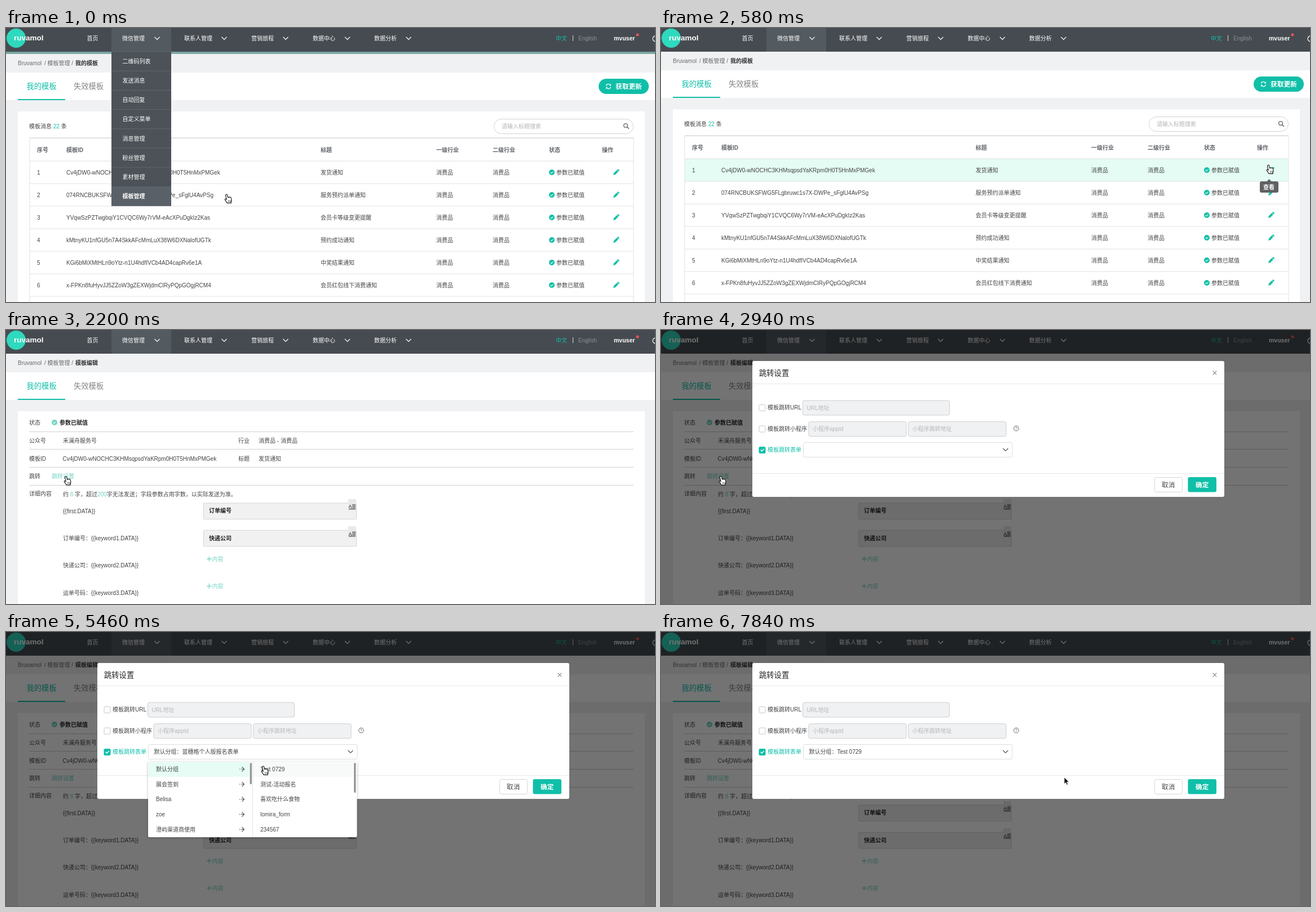
An HTML page that plays this animation: 1151x486 px, repeating every 7990 ms.

```html
<!DOCTYPE html>
<html lang="zh-CN">
<head>
<meta charset="utf-8">
<style>
html, body { margin: 0; width: 100%; height: 100%; overflow: hidden; background: #f0f1f3; }
svg { display: block; font: 10px "Liberation Sans", "Noto Sans CJK SC", "Noto Sans CJK", sans-serif; }
</style>
</head>
<body>
<svg id="stage" width="1151" height="486" viewBox="0 0 1151 486"></svg>
<script>
const TEAL = '#10bfa8', SOFT = '#74d3c4', INK = '#444', LINE = '#e0e2e4';

// Text is placed by its left edge and vertical middle.
const text = (x, y, s, fill = INK, size = 10, bold = false) =>
  `<text x="${x}" y="${y + size * .37}" fill="${fill}" font-size="${size}"${bold ? ' font-weight="bold"' : ''}>${s}</text>`;
const rect = (x, y, w, h, fill, extra = '') =>
  `<rect x="${x}" y="${y}" width="${w}" height="${h}" fill="${fill}" ${extra}/>`;
const box = (x, y, w, h, fill, stroke, r = 3) => rect(x, y, w, h, fill, `stroke="${stroke}" rx="${r}"`);
const path = (d, stroke, width = 1, extra = '') =>
  `<path d="${d}" fill="none" stroke="${stroke}" stroke-width="${width}" ${extra}/>`;
const circle = (x, y, r, fill, extra = '') => `<circle cx="${x}" cy="${y}" r="${r}" fill="${fill}" ${extra}/>`;
const group = (id, body, extra = '') => `<g id="${id}" ${extra}>${body}</g>`;
const tint = (s, fill) => `<tspan fill="${fill}">${s}</tspan>`;
const chevron = (x, y, color) => path(`M${x - 4.5} ${y - 2}l4.5 4.5l4.5-4.5`, color, 1.2);
const tick = (x, y, color) => circle(x, y, 5, color) + path(`M${x - 2.3} ${y}l1.8 1.8l3-3.3`, '#fff', 1.1);
const pencil = y => `<g transform="translate(1082 ${y}) rotate(45)" fill="${TEAL}">
  <path d="M-1.9-3.6h3.8v7.2l-1.9 3.4l-1.9-3.4z"/><path d="M-1.9-4.4v-1.4q0-1 1-1h1.8q1 0 1 1v1.4z"/></g>`;

function header() {
  const menus = [[206, '微信管理', 268], [316, '联系人管理', 387], [435, '营销旅程', 496],
                 [544, '数据中心', 605.5], [653, '数据分析', 714]];
  return rect(0, 0, 1151, 42, '#464b51') + rect(187, 0, 106, 42, '#535a60')
    + circle(18, 18, 17, '#2fd9bd') + text(14, 17.5, 'ruvamol', '#fff', 13.5, true)
    + text(143.5, 18, '首页', '#fff')
    + menus.map(([x, s, cx]) => text(x, 18, s, '#fff') + chevron(cx, 18, '#fff')).join('')
    + text(975, 18, '中文', TEAL) + rect(1005, 13, 1, 10, '#ddd') + text(1015, 18, 'English', '#8b9095')
    + text(1078, 18, 'mvuser', '#fff', 10.5, true) + circle(1120, 12, 2.5, '#f25555')
    + circle(1152, 19, 5, 'none', 'stroke="#fff" stroke-width="1.2"');
}

function navMenu() {
  const items = ['二维码列表', '发送消息', '自动回复', '自定义菜单', '消息管理', '粉丝管理', '素材管理', '模板管理'];
  const h = 34.2;
  return rect(187, 42, 106, h * 8, '#4c5258') + rect(187, 42 + h * 7, 106, h, '#596067')
    + items.map((s, i) => rect(187, 41.5 + h * i, 106, 1, '#5f666c')
      + text(206.5, 59 + h * i, s, '#fff', 10, i == 7)).join('');
}

function frame() {
  return text(21, 58, 'Bruvamol', '#6a6a6a') + text(68, 58, '/ 模板管理 /', '#6a6a6a')
    + rect(0, 75, 1151, 49, '#fff') + rect(21, 122, 84, 2, TEAL)
    + text(36.5, 99.5, '我的模板', TEAL, 13.3) + text(120, 99.5, '失效模板', '#858585', 13.3)
    + rect(21, 144, 1112, 350, '#fff');
}

function list() {
  const rows = [
    ['Cv4jDW0-wNOCHC3KHMsqpsdYaKRpm0H0T5HnMxPMGek', '发货通知'],
    ['074RNCBUKSFWG5FLgbruwc1s7X-DWPe_sFglU4AvPSg', '服务预约派单通知'],
    ['YVqwSzPZTwgbqiY1CVQC6Wy7rVM-eAcXPuDgkIz2Kas', '会员卡等级变更提醒'],
    ['kMtnyKU1nfGU5n7A4SkkAFcMmLuX38W6DXNalofUGTk', '预约成功通知'],
    ['KGi6bMiXMtHLn9oYtz-n1U4hdfIVCb4AD4capRv6e1A', '中奖结果通知'],
    ['x-FPKn8fuHyvJJ5ZZoW3gZEXWjdmClRyPQpGOgjRCM4', '会员红包线下消费通知']];
  const cols = [55, 107, 558, 763, 863, 963, 1057];
  const heads = ['序号', '模板ID', '标题', '一级行业', '二级行业', '状态', '操作'];
  const row = ([id, title], i) => {
    const y = 252 + 40 * i;
    const cells = [i + 1, id, title, '消费品', '消费品'];
    return cells.map((s, c) => text(cols[c], y, s)).join('') + tick(968, y, TEAL)
      + text(976, y, '参数已赋值') + pencil(y) + rect(42, y + 19.5, 1071, 1, LINE);
  };
  return text(123, 58, '我的模板', '#333', 10, true)
    + rect(1051, 86, 89, 27, TEAL, 'rx="13.5"') + text(1081, 99.5, '获取更新', '#fff', 11.7, true)
    + path('M1064.3 98.5a4.2 4.2 0 0 1 7.8-.8M1072.6 100.7a4.2 4.2 0 0 1-7.8.8', '#fff', 1.2)
    + path('M1072.5 95.3v2.7h-2.6M1064.4 103.9v-2.7h2.6', '#fff')
    + text(41, 170, `模板消息 ${tint('22', TEAL)} 条`)
    + box(865.5, 157.5, 247, 26, '#fff', '#d0d3d6', 13) + text(879, 170.5, '请输入标题搜索', '#b4b4b4')
    + circle(1099, 169, 3.4, 'none', 'stroke="#666" stroke-width="1.3"') + path('M1101.5 171.5l3.3 3.3', '#666', 1.6)
    + group('hover', rect(42, 232, 1071, 40, '#e5fcf4'))
    + rect(42, 190.5, 1071, 1.2, '#c9cdd1') + rect(41.5, 191, 1, 300, LINE) + rect(1112.5, 191, 1, 300, LINE)
    + heads.map((s, i) => text(cols[i], 212, s, '#60646a', 10, true)).join('')
    + rect(42, 231.5, 1071, 1, LINE) + rows.map(row).join('')
    + group('tip', '<path d="M1074 272.5l4.5-4.5l4.5 4.5z" fill="#5f6163"/>'
      + rect(1062, 272, 33, 20, '#5f6163', 'rx="3"') + text(1068, 282, '查看', '#fff', 10, true));
}

function edit() {
  const field = (y, s) => box(350.5, y - 14, 271, 28.5, '#f1f1f1', '#d5d5d5', 1)
    + rect(607, y - 21, 14, 21, '#e9e9e9') + text(360, y - .5, s, '#222', 10, true)
    + text(607.5, y - 8, 'A', '#222', 9) + path(`M614 ${y - 11}h6m-6 2.5h6m-6 2.5h6M608 ${y - 3.5}h12`, '#222', 1);
  const add = y => path(`M356 ${y}h8.5m-4.2-4.2v8.4`, SOFT, 1.3) + text(365.5, y, '内容', SOFT);
  return text(123, 58, '模板编辑', '#333', 10, true)
    + [180, 211, 243, 275].map(y => rect(41, y, 1072, 1, '#d0d0d0')).join('')
    + text(41, 164, '状态') + tick(86, 164, SOFT) + text(95, 164, '参数已赋值', '#222', 10, true)
    + text(41, 196, '公众号') + text(101, 196, '禾澜舟服务号') + text(412, 196, '行业') + text(448, 196, '消费品 - 消费品')
    + text(41, 228, '模板ID') + text(100.5, 228, 'Cv4jDW0-wNOCHC3KHMsqpsdYaKRpm0H0T5HnMxPMGek')
    + text(412, 228, '标题') + text(448, 228, '发货通知')
    + text(41, 259.5, '跳转') + text(81, 259.5, '跳转设置', SOFT) + text(41, 290, '详细内容')
    + text(101, 291.5, `约 ${tint('8', SOFT)} 字，超过${tint('200', SOFT)}字无法发送；字段参数占用字数，以实际发送为准。`)
    + ['{{first.DATA}}', '订单编号：{{keyword1.DATA}}', '快递公司：{{keyword2.DATA}}', '运单号码：{{keyword3.DATA}}']
      .map((s, i) => text(101, 321 + 48.3 * i, s)).join('')
    + field(321, '订单编号') + field(369.3, '快递公司') + add(406) + add(454.3);
}

function modal() {
  const check = (y, on) => box(174, y - 5.5, 11, 11, on ? TEAL : '#fff', on ? TEAL : '#c4c8cc', 1.5)
    + (on ? path(`M176.7 ${y - .2}l2.2 2.2l3.7-4.1`, '#fff', 1.4) : '');
  const input = (x, y, w, s) => box(x, y, w, 26, '#f0f1f2', '#cbced2') + text(x + 7, y + 13, s, '#b5b8bc');
  return rect(0, 0, 1151, 486, '#000', 'opacity=".55"')
    + rect(162, 55, 837, 241, '#fff', 'rx="3"')
    + text(174, 76, '跳转设置', '#222', 13.3) + path('M978.7 72.7l6.6 6.6m0-6.6l-6.6 6.6', '#888', 1.2)
    + rect(162, 95, 837, 1, '#e6e8ea') + rect(162, 254, 837, 1, '#e6e8ea')
    + check(138) + text(189, 137.5, '模板跳转URL') + input(251.5, 125, 260, 'URL地址')
    + check(175.5) + text(189, 175, '模板跳转小程序') + input(262, 162.7, 173, '小程序appid') + input(438.7, 162.7, 173.3, '小程序跳转地址')
    + circle(630, 174.5, 4.4, 'none', 'stroke="#666"') + text(627.8, 174.7, '?', '#666', 7.5)
    + check(213, true) + text(189, 212.5, '模板跳转表单', TEAL)
    + box(252.5, 199.5, 370.5, 26, '#fff', '#dadde0').replace('<rect', '<rect id="select"')
    + '<text id="choice" x="262.5" y="216" fill="#444"></text>' + chevron(611, 212, '#555')
    + box(875.5, 261.5, 49, 26, '#fff', '#d3d6d9') + text(888, 274.3, '取消', '#444', 11.7)
    + rect(934.5, 261, 50.5, 26.5, TEAL, 'rx="3"') + text(948, 274.3, '确定', '#fff', 11.7, true);
}

function dropdown() {
  const groups = ['默认分组', '展会签到', 'Belisa', 'zoe', '澄屿渠道商使用'];
  const forms = ['Test 0729', '测试-活动报名', '喜欢吃什么食物', 'lomira_form', '234567'];
  const y = i => 243.3 + 26.7 * i;
  return rect(252, 230, 370.5, 134, '#fff', 'rx="2" style="filter:drop-shadow(0 1px 2px #0004)"')
    + rect(252.5, 230.5, 179, 26.5, '#e6fcf5') + group('option', rect(438, 230.5, 178, 26.5, '#f8faf9'))
    + groups.map((s, i) => text(266, y(i), s)).join('') + forms.map((s, i) => text(451, y(i), s)).join('')
    + groups.map((s, i) => path(`M418.3 ${y(i) - 4.2}l4.2 4.2l-4.2 4.2M417 ${y(i)}h5M413.8 ${y(i)}h1.6`, '#555', 1.1)).join('')
    + group('shafts', groups.map((s, i) => path(`M415 ${y(i)}h2.5`, '#555', 1.1)).join(''))
    + rect(437, 230, 1, 134, '#e2e4e6')
    + rect(432.5, 232, 3.5, 38, '#999', 'rx="1.5"') + rect(617, 232, 3.5, 53, '#999', 'rx="1.5"');
}

const hand = '<path d="M-2.4-7.7q1.5-.8 2 .8l.9 4.3q.8-1 1.8-.2q1-.8 1.8.1q1.5-.6 2 .8l.8 3.2q.4 2-.8 4.6l.1 1.5h-7.2q-1-2.4-3.6-5.6q-.6-1.6 1-1.7l1.7 1.2l-1.6-7.5q-.1-1 1.1-1.5z" fill="#fff" stroke="#111" stroke-width="1.1"/>'
  + path('M1.4 2.5v3m2-3v3m2-3v3', '#111', .7);
const arrow = '<path d="M-3-7v12.2l2.8-2.6l1.9 4.3l2.2-1l-1.9-4.2h3.8z" fill="#111" stroke="#fff"/>';

stage.innerHTML = rect(0, 0, 1151, 486, '#f0f1f3')
  + group('page', frame() + group('list', list()) + group('edit', edit()))
  + header() + group('strip', rect(0, 42, 1151, 4, '#7ba6a3')) + group('menu', navMenu())
  + group('modal', modal()) + group('drop', dropdown())
  + group('pointer', group('hand', hand) + group('arrow', arrow));

const el = id => document.getElementById(id);
const show = (id, on) => el(id).setAttribute('display', on ? 'inline' : 'none');
const place = (id, x, y) => el(id).setAttribute('transform', `translate(${x} ${y})`);

const stepped = (t, start, end, steps) => {
  const k = Math.floor((t + 8 - start) / ((end - start) / (steps - 1))) + 1;
  return Math.max(0, Math.min(steps, k)) / steps;
};
const ease = u => u * u * (3 - 2 * u);
const mix = (a, b, u) => a + (b - a) * u;
const glide = (a, b, u, dip = 0) => [mix(a[0], b[0], ease(u)), mix(a[1], b[1], ease(u)) + 4 * dip * u * (1 - u)];

const ROW = [393, 303], ICON = [1079, 251], REST = [1087, 257], LINK = [108, 267.5],
      SELECT = [458, 223.5], OPTION = [458, 246], PICK = [525, 252], END = [718, 264.5];

function pointerAt(t) {
  if (t < 720) return glide(ROW, ICON, stepped(t, 150, 580, 4));
  if (t < 1300) return glide(ICON, REST, stepped(t, 1020, 1170, 2));
  if (t < 3380) return glide(REST, LINK, stepped(t, 1310, 2200, 7), 48);
  if (t < 5160) return glide(LINK, SELECT, stepped(t, 3390, 4280, 7));
  if (t < 5600) return glide(SELECT, OPTION, stepped(t, 5170, 5460, 3));
  if (t < 7540) return glide(OPTION, PICK, stepped(t, 5610, 6050, 4));
  return glide(PICK, END, stepped(t, 7550, 7840, 3));
}

function dropState(t) {
  if (t < 4580 || t >= 6950) return [0, 0];
  if (t < 4730) return [.48, -8];
  if (t < 4880) return [.88, -2];
  return t < 6800 ? [1, 0] : [.5, -4];
}

function draw(t) {
  const [x, y] = pointerAt(t);
  const opening = t < 290, editing = t >= 1020, picked = t >= 6800;
  place('page', 0, opening ? 4 : 0);
  show('strip', opening);
  show('menu', opening);
  show('list', !editing);
  show('edit', editing);
  show('hover', !opening);
  place('hover', 0, 40 * Math.floor((y - 232) / 40));
  show('tip', t >= 580);
  show('modal', t >= 2940);

  const focused = t >= 4280 && t < 5320;
  el('select').setAttribute('stroke', focused ? TEAL : '#dadde0');
  el('choice').textContent = t < 3390 ? '' : picked ? '默认分组：Test 0729' : '默认分组：蓝穗格个人版报名表单';

  const [alpha, shift] = dropState(t);
  show('drop', alpha > 0);
  el('drop').setAttribute('opacity', alpha);
  place('drop', 0, shift);
  show('shafts', t < 4880);
  show('option', t >= 5460);

  const pressing = t < 150 || t >= 580 && !editing || t >= 2190 && t < 3390 || t >= 4280 && t < 6950;
  show('hand', pressing);
  show('arrow', !pressing);
  place('pointer', x, y);
}

const begin = performance.now();
(function loop() {
  draw((performance.now() - begin) % 7990);
  requestAnimationFrame(loop);
})();
</script>
</body>
</html>
```
